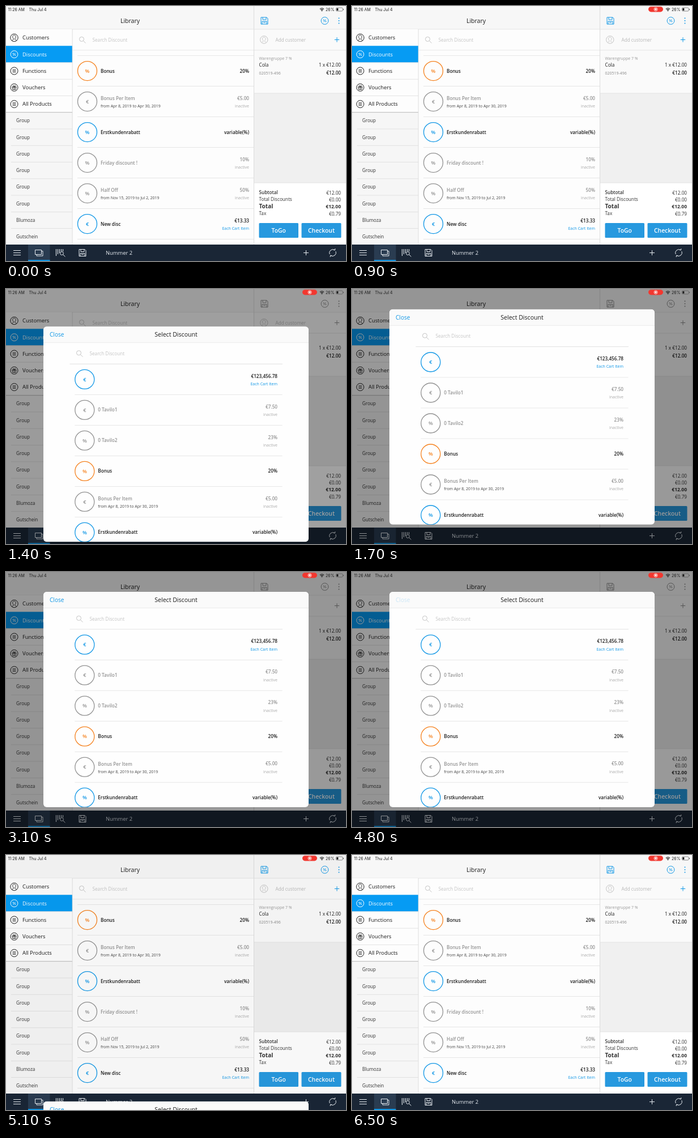
Recreate the animation shown at these times as an HTML page. Size 600x450 px, loop 6.6 s.

```html
<!DOCTYPE html>
<html lang="en">
<head>
<meta charset="utf-8">
<title>Discount picker</title>
<style>
html, body { margin: 0; width: 100%; height: 100%; overflow: hidden; background: #fff; }
svg { display: block; width: 600px; height: 450px; }
text { font-family: "Open Sans", "Noto Sans", sans-serif; white-space: pre; }
#status text { font-family: Inter, Roboto, sans-serif; }
</style>
</head>
<body>
<svg id="stage" viewBox="0 0 600 450"></svg>
<script>
const BLUE = '#1197e6', ORANGE = '#f5821f', GREY = '#929292', DARK = '#1c1c1c', PALE = '#c4c4c4';
const CENTERED = { anchor: 'middle' }, RIGHT = { anchor: 'end' };

// y is the vertical centre of the capitals
const text = (x, y, label, size, fill = DARK, { anchor = 'start', weight = 400 } = {}) =>
  `<text x="${x}" y="${(y + size * 0.36).toFixed(2)}" font-size="${size}" fill="${fill}" ` +
  `text-anchor="${anchor}" font-weight="${weight}">${label}</text>`;
const bold = (x, y, label, fill, anchor = 'start', size = 8.2) =>
  text(x, y, label, size, fill, { anchor, weight: 600 });
const rect = (x, y, w, h, fill, r = 0) =>
  `<rect x="${x}" y="${y}" width="${w}" height="${h}" rx="${r}" fill="${fill}"/>`;
const hline = (x1, x2, y, stroke = '#e2e2e2') => rect(x1, y - 0.4, x2 - x1, 0.8, stroke);
const path = (d, stroke, width = 1, extra = '') =>
  `<path d="${d}" fill="none" stroke="${stroke}" stroke-width="${width}" ${extra}/>`;
const ring = (x, y, r, stroke, width = 1) =>
  `<circle cx="${x}" cy="${y}" r="${r}" fill="none" stroke="${stroke}" stroke-width="${width}"/>`;
const at = (x, y, content) => `<g transform="translate(${x} ${y})">${content}</g>`;

const floppy = color => path('M-6-6H4L6-4V6H-6Z M-3-6V-2H3V-6 M-4 6V1H4V6 M-2 3H2', color);
const plus = (color, r) => path(`M${-r} 0H${r}M0 ${-r}V${r}`, color);
const percent = color => ring(0, 0, 6.4, color) + path('M2-2.5L-2 2.5', color, 0.9) +
  ring(-1.8, -1.3, 0.9, color, 0.7) + ring(1.8, 1.3, 0.9, color, 0.7);
const person = color => ring(0, 0, 6.7, color) +
  path('M-4 5C-3 3-1 4-1 2C-4-1-3-4.5 0-4.5S4-1 1 2C1 4 3 3 4 5', color, 0.9);
const list = color => ring(0, 0, 6.5, color) + path('M-3-2.3H3M-3 0H3M-3 2.3H3', color, 0.9);
const gift = color => ring(0, 0, 6.5, color) +
  path('M-3.5-1.5H3.5V.3H-3.5Z M-3 .3V3.7H3V.3 M0-1.5V3.7 M0-1.5C-4-3-1-5 0-1.5C1-5 4-3 0-1.5', color, 0.8);
const magnifier = (color, r) => ring(-1, -1, r, color) +
  path(`M${r * 0.7 - 1} ${r * 0.7 - 1}L${r + 2} ${r + 2}`, color);

function discountRow(x, right, y, [sign, name, value, color, note, dates]) {
  const active = color !== GREY, ink = active ? DARK : GREY;
  return ring(x + 17.5, y, 17, color, 1.3) +
    bold(x + 17.5, y, sign, color, 'middle', 9) +
    bold(x + 41, y - (dates ? 5.5 : 0), name, ink) +
    (dates ? text(x + 41, y + 7.8, dates, 7, '#444') : '') +
    bold(right, y - (note ? 5.7 : 0), value, ink, 'end') +
    (note ? text(right, y + 8, note, 7, active ? BLUE : '#aaa', RIGHT) : '');
}
const discountRows = (x, right, top, rows) => rows.map((row, i) =>
  discountRow(x, right, top + i * 54, row) + hline(x, right + 8.5, top + 27 + i * 54)).join('');

const bonus = ['%', 'Bonus', '20%', ORANGE];
const perItem = ['€', 'Bonus Per Item', '€5.00', GREY, 'inactive', 'from Apr 8, 2019 to Apr 30, 2019'];
const newCustomer = ['%', 'Erstkundenrabatt', 'variable(%)', BLUE];
const libraryRows = [bonus, perItem, newCustomer,
  ['%', 'Friday discount !', '10%', GREY, 'inactive'],
  ['%', 'Half Off', '50%', GREY, 'inactive', 'from Nov 15, 2019 to Jul 2, 2019'],
  ['€', 'New disc', '€13.33', BLUE, 'Each Cart Item']];
const pickerRows = [
  ['€', '', '€123,456.78', BLUE, 'Each Cart Item'],
  ['€', '0 Tavilo1', '€7.50', GREY, 'inactive'],
  ['%', '0 Tavilo2', '23%', GREY, 'inactive'],
  bonus, perItem, newCustomer];

function sidebar() {
  const main = [['Customers', person], ['Discounts', percent], ['Functions', list],
    ['Vouchers', gift], ['All Products', list]];
  const groups = [...Array(6).fill('Group'), 'Blumoza', 'Gutschein'];
  const pitch = 29.27, center = i => 56 + i * pitch;
  return rect(0, 41, 117, 147, '#fdfdfd') + rect(0, 187.5, 117, 234, '#f6f6f6') +
    main.map(([label, icon], i) => {
      const selected = i === 1, ink = selected ? '#fff' : DARK;
      return (selected ? rect(0, 70.3, 117, 29.3, '#069bf3') : '') +
        at(14.5, center(i), icon(ink)) + text(29, center(i), label, 9.375, ink) +
        (i ? hline(0, 117, center(i) + pitch / 2, i === 4 ? '#aaa' : '#ddd') : '');
    }).join('') +
    groups.map((label, i) => text(18, center(i + 5), label, 8.2, '#333') +
      (i < 7 ? hline(9, 117, center(i + 5) + pitch / 2, '#dcdcdc') : '')).join('') +
    rect(116.7, 41, 0.8, 380, '#d8d8d8');
}

function cart() {
  const totals = [[329.5, 'Subtotal', '€12.00', 8.2, 8.2, 600, 400],
    [341.5, 'Total Discounts', '€0.00', 8.2, 8.2, 400, 400],
    [353.5, 'Total', '€12.00', 10, 8.5, 700, 700],
    [366, 'Tax', '€0.79', 8.2, 8.2, 400, 400]];
  const button = (x, w, label) => rect(x, 383, w, 26, '#2799df', 1.5) +
    text(x + w / 2, 396.3, label, 10.4, '#fff', { anchor: 'middle', weight: 600 });
  return rect(438, 0, 162, 41, '#f7f7f7') + rect(438, 41, 162, 113, '#fafafa') +
    rect(438, 154, 162, 158, '#f0f0f0') + rect(438, 312, 162, 109, '#fff') +
    [41, 78, 154, 312].map(y => hline(438, 600, y, '#dedede')).join('') +
    rect(437, 0, 0.8, 421, '#d4d4d4') +
    `<g id="tinted" color="${BLUE}">` + at(456, 26, floppy('currentColor')) +
    `<g id="percentButton">${at(562.5, 26, percent('currentColor'))}</g>` +
    [-4.5, 0, 4.5].map(d => `<circle cx="587.5" cy="${26 + d}" r="1" fill="currentColor"/>`).join('') +
    at(584, 59.5, plus('currentColor', 4.2)) + '</g>' +
    at(455.3, 59.5, person(PALE)) + text(475.5, 59.8, 'Add customer', 8.2, '#b8b8b8') +
    text(446.5, 92.5, 'Warengruppe 7 %', 7, '#999') +
    text(446.5, 104.5, 'Cola', 8.2) + text(591, 104.5, '1 x €12.00', 8.2, DARK, RIGHT) +
    text(446.5, 118, '020519-496', 7, '#888') + bold(591, 118, '€12.00', DARK, 'end') +
    totals.map(([y, label, sum, size, sumSize, weight, sumWeight]) =>
      text(446.5, y, label, size, '#333', { weight }) +
      text(591, y + 0.7, sum, sumSize, '#333', { anchor: 'end', weight: sumWeight })).join('') +
    button(446.5, 69.5, 'ToGo') + button(521.5, 70, 'Checkout');
}

function toolbar() {
  const ink = '#e8edf2';
  return rect(0, 421, 600, 29, '#1a2636') + rect(39, 421, 38.5, 29, '#2a3c51') +
    rect(39, 448, 38.5, 2, BLUE) +
    path('M13 431.5H26M13 435.5H26M13 439.5H26', ink) +
    path('M51.5 430.5H62.5V438.5H51.5Z M62.5 432.5H65V441H54V438.5', ink) +
    path('M88.5 429V441M91.5 429V438M94.5 429V436M97.5 429V433M100.5 429V433', ink, 1.1) +
    at(99.5, 437.5, magnifier(ink, 2.9)) + at(135, 435.5, floppy(ink)) +
    text(176, 435.7, 'Nummer 2', 9.375, ink) + at(529.5, 435.5, plus(ink, 4.5)) +
    at(576.5, 435.5, path('M-5.4 2.5A6 6 0 0 1 3.5-4.8M5.4-2.5A6 6 0 0 1-3.5 4.8' +
      'M1-5.5L4-4.6L4.3-7.5M-1 5.5L-4 4.6L-4.3 7.5', ink));
}

const statusBar = () => '<g id="status">' + text(3.5, 6, '11:26 AM', 7) + text(40.5, 6, 'Thu Jul 4', 7) +
  at(557.5, 8, path('M-3.6-2.7A5 5 0 0 1 3.6-2.7M-2.2-1.1A3 3 0 0 1 2.2-1.1', DARK, 1.2) +
    `<circle r="1" cy=".2" fill="${DARK}"/>`) +
  text(579.5, 6, '26%', 7, DARK, RIGHT) +
  '<rect x="582.5" y="3" width="11.5" height="6" rx="1.5" fill="none" stroke="#555" stroke-width=".7"/>' +
  rect(583.5, 4, 2.8, 4, DARK, 0.5) + rect(595, 4.8, 1, 2.4, '#555', 0.5) +
  '<g id="recording">' + rect(523, 1.2, 26, 9.2, '#f2372f', 4.6) + ring(536, 5.8, 3, '#fff', 0.8) +
  '<circle cx="536" cy="5.8" r="1.7" fill="#fff"/></g></g>';

const picker = () => '<g id="picker"><g clip-path="url(#sheet)">' + rect(66, 35, 468, 380, '#fefefe') +
  rect(66, 35, 468, 28.5, '#fafafa') + hline(66, 534, 63.5, '#e6e6e6') +
  `<g id="close">${text(77, 49.3, 'Close', 10.1, BLUE)}</g>` +
  text(300, 49, 'Select Discount', 10.6, DARK, CENTERED) +
  at(129.5, 82.5, magnifier(PALE, 4)) + text(147.5, 82.7, 'Search Discount', 8.2, PALE) +
  hline(112.5, 488, 101, '#dadada') + discountRows(121.3, 479, 128.2, pickerRows) + '</g></g>';

document.getElementById('stage').innerHTML =
  '<clipPath id="sheet"><rect x="66" y="35" width="468" height="380" rx="6"/></clipPath>' +
  rect(0, 0, 600, 450, '#fdfdfd') + rect(0, 0, 437, 41, '#f7f7f7') + hline(0, 437, 41, '#dedede') +
  text(219, 26.3, 'Library', 10.55, DARK, CENTERED) +
  at(134.5, 59.5, magnifier(PALE, 4)) + text(152.5, 59.7, 'Search Discount', 8.2, PALE) +
  hline(117, 437, 78) + hline(126, 437, 87.5) + discountRows(126, 429, 114.6, libraryRows) +
  sidebar() + cart() + toolbar() +
  '<rect id="dim" width="600" height="450"/>' + picker() + statusBar();

const [tinted, percentButton, dim, sheet, close, recording] =
  ['tinted', 'percentButton', 'dim', 'picker', 'close', 'recording'].map(id => document.getElementById(id));

const LOOP = 6600, STEP = 100, OPEN = 1100, DISMISS = 4800, TRAVEL = 431;

// Critically damped spring from 0 to 1
function spring(ms) {
  const k = Math.max(0, ms) * 0.0143;
  return 1 - (1 + k) * Math.exp(-k);
}
// A pressed button turns pale, then recovers after release
const pressOpacity = (t, release) =>
  t < release - 100 ? 1 : Math.min(1, 0.2 + 0.8 * Math.max(0, t - release) / 300);

function render(now) {
  const t = Math.floor(now % LOOP / STEP) * STEP;
  const shown = spring(t - OPEN) * (1 - spring(t - DISMISS));
  sheet.setAttribute('transform', `translate(0 ${(TRAVEL * (1 - shown)).toFixed(2)})`);
  sheet.setAttribute('visibility', t > OPEN && shown > 0.02 ? 'visible' : 'hidden');
  dim.setAttribute('opacity', (0.4 * shown).toFixed(3));
  tinted.setAttribute('color', t > OPEN + 100 && t <= DISMISS ? '#8c8c8c' : BLUE);
  percentButton.setAttribute('opacity', pressOpacity(t, OPEN));
  close.setAttribute('opacity', pressOpacity(t, DISMISS));
  recording.setAttribute('visibility', t >= 200 ? 'visible' : 'hidden');
}

const start = performance.now();
function tick() {
  render(performance.now() - start);
  requestAnimationFrame(tick);
}
tick();
</script>
</body>
</html>
```
